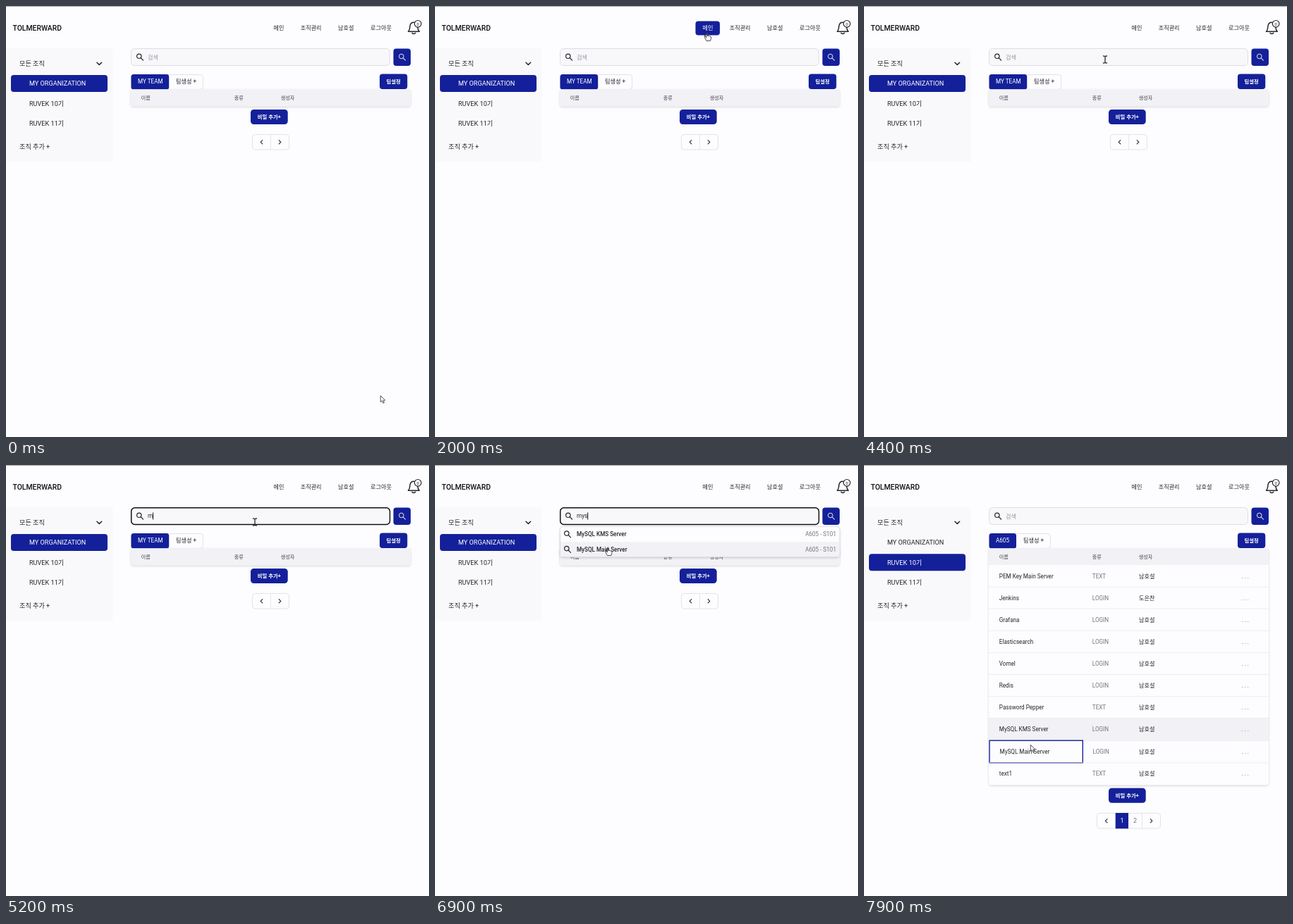
Recreate the animation shown at these times as an HTML page. Size 600 by 612 pixels, loop 8000 ms.

```html
<!DOCTYPE html>
<html lang="en">
<head>
<meta charset="utf-8">
<title>Team secrets</title>
<style>
  html, body { margin: 0; width: 100%; height: 100%; overflow: hidden; background: #fdfcfe; }
  svg { display: block; width: 600px; height: 612px; }
  text { font: 8.15px Roboto, "Noto Sans CJK KR", sans-serif; fill: #26262b; white-space: pre; }
  .side text { font-size: 9.15px; }
  .head text { font-size: 7.1px; fill: #44444c; }
  .title { font-size: 10.4px; font-weight: 500; fill: #111; }
  .btn { font-size: 7.4px; font-weight: 700; }
  .mid { text-anchor: middle; }
  .end { text-anchor: end; }
  .strong { font-weight: 500; }
  .dim { fill: #74747c; }
  .hint { fill: #96969e; }
  .white { fill: #fff; }
  .blue { fill: #14209a; }
  .soft { fill: #f2f1f5; }
  .box { fill: #fdfdff; stroke: #e2e2e8; }
  .line { fill: none; stroke: #26262b; stroke-linecap: round; stroke-linejoin: round; }
  .rule { stroke: #e6e6ec; }
  .cursor { fill: #fff; stroke: #3c3c42; stroke-width: .9; stroke-linejoin: round; }
  .shadow { filter: drop-shadow(0 1.5px 1.5px rgba(0, 0, 0, .17)); }
</style>
</head>
<body>
<svg viewBox="0 0 600 612">
  <defs>
    <g id="lens" class="line">
      <circle cx="-1.2" cy="-1.2" r="3.2"/>
      <path d="M1.2 1.2 4.5 4.5"/>
    </g>
    <path id="prev" class="line" d="M1.3 -2.6 -1.3 0 1.3 2.6" stroke-width="1.1"/>
    <path id="next" class="line" d="M-1.3 -2.6 1.3 0 -1.3 2.6" stroke-width="1.1"/>
  </defs>

  <rect width="600" height="612" fill="#fdfcfe"/>
  <rect width="600" height="1" fill="#a3a3a8"/>

  <!-- top bar -->
  <text class="title" x="9.5" y="34.8">TOLMERWARD</text>
  <text x="379.5" y="33.7">메인</text>
  <g data-on="1900,2400">
    <rect class="blue" x="369.5" y="21.5" width="34.5" height="20" rx="4"/>
    <text class="white strong" x="379.5" y="33.7">메인</text>
  </g>
  <text x="417.7" y="33.7">조직관리</text>
  <text x="471" y="33.7">남호설</text>
  <text x="517" y="33.7">로그아웃</text>
  <g class="line" stroke-width="1.5">
    <path d="M570.5 36.3C573 34 572.6 31.500 573 28.500C573.4 25.500 575.500 23.300 578.300 23.300C582 23.300 583.600 26 583.800 29C584 32.500 584 34 586.300 36.300Z"/>
    <path d="M576 38.200Q578.400 40.800 580.800 38.200"/>
    <circle cx="584.2" cy="25.300" r="4.800" fill="#fdfcfe" stroke-width="1.200"/>
  </g>
  <text class="mid" x="584.2" y="27.500" style="font-size:6px">0</text>

  <!-- side bar -->
  <g class="side">
    <rect y="60" width="151.500" height="161" fill="#f9f8fb"/>
    <text class="strong" x="19" y="84.700">모든 조직</text>
    <path class="line" d="M129 80.300 132.300 83.500 135.600 80.300" stroke-width="1.600"/>
    <rect class="soft" data-on="7200,7400" x="7" y="98" width="137" height="24" rx="4"/>
    <text x="33" y="113.300">MY ORGANIZATION</text>
    <text x="33" y="141.600">RUVEK 10기</text>
    <g data-on="0,7200">
      <rect class="blue" x="7" y="98" width="137" height="24" rx="4"/>
      <text class="white" x="33" y="113.300">MY ORGANIZATION</text>
    </g>
    <g data-on="7200,8000">
      <rect class="blue" x="7" y="126.300" width="137" height="24" rx="4"/>
      <text class="white" x="33" y="141.600">RUVEK 10기</text>
    </g>
    <text x="33" y="169.900">RUVEK 11기</text>
    <text x="19" y="202.500">조직 추가 +</text>
  </g>

  <!-- search -->
  <rect x="177.500" y="60.500" width="367" height="24" rx="5" fill="#f8f7fa" stroke="#dedde4"/>
  <rect data-on="4700,7200" x="177.700" y="60.700" width="366.800" height="23.800" rx="5" fill="none" stroke="#111" stroke-width="1.500"/>
  <use href="#lens" x="190" y="72.500" stroke-width="1.200"/>
  <text class="hint" data-on="0,5100" x="201" y="75.600">검색</text>
  <text class="hint" data-on="7200,8000" x="201" y="75.600">검색</text>
  <text id="query" x="201" y="75.400"></text>
  <rect id="caret" y="67.500" width="1" height="10" fill="#111"/>
  <rect class="blue" x="549.500" y="60.500" width="24.500" height="24.500" rx="4"/>
  <use href="#lens" x="562" y="72.700" style="filter:invert(1)" stroke-width="1.100"/>

  <!-- tabs -->
  <g data-on="0,7200">
    <rect class="box" x="177.500" y="97.500" width="102" height="21" rx="4"/>
    <rect class="blue" x="177.500" y="97" width="53.700" height="21.500" rx="3.500"/>
    <text class="white" x="187" y="110.400">MY TEAM</text>
    <text x="241" y="110.400">팀생성 +</text>
    <g data-on="3400,3900">
      <rect class="blue" x="232" y="97" width="48" height="21.500" rx="3"/>
      <text class="white" x="241" y="110.400">팀생성 +</text>
    </g>
  </g>
  <g data-on="7200,8000">
    <rect class="box" x="177.500" y="97.500" width="87" height="21" rx="4"/>
    <rect class="blue" x="177.500" y="97" width="38.500" height="21.500" rx="3.500"/>
    <text class="white" x="187" y="110.400">A605</text>
    <text x="226" y="110.400">팀생성 +</text>
  </g>
  <rect class="blue" x="530" y="96.500" width="39.300" height="21.500" rx="4"/>
  <text class="btn white mid" x="549.700" y="110">팀설정</text>

  <!-- table -->
  <rect class="shadow" id="card" x="177" y="118.500" width="397" height="24" rx="4" fill="#fdfdff"/>
  <g class="head">
    <path class="soft" d="M177 118.500H574V142H177Z"/>
    <text x="191.700" y="132.800">이름</text>
    <text x="323.700" y="132.800">종류</text>
    <text x="389.700" y="132.800">생성자</text>
  </g>
  <g id="rows" data-on="7500,8000"></g>

  <g id="add">
    <rect class="blue" x="347" y="147" width="52.700" height="21" rx="4.500"/>
    <text class="btn white mid" x="373.300" y="160.200">비밀 추가+</text>
  </g>
  <g data-on="0,7500">
    <rect class="box" x="349.500" y="182.500" width="52" height="21.500" rx="4"/>
    <path class="rule" d="M375.500 182.500V204"/>
    <use href="#prev" x="362.500" y="193.300"/>
    <use href="#next" x="388.500" y="193.300"/>
  </g>
  <g data-on="7500,8000">
    <rect class="box" x="330.500" y="494.500" width="90" height="21.500" rx="4"/>
    <path class="rule" d="M394.500 494.500V516"/>
    <rect class="blue" x="356.700" y="494" width="18.300" height="22.300"/>
    <text class="white mid" x="366" y="508.400" style="font-size:9px">1</text>
    <text class="dim mid" x="384.500" y="508.400" style="font-size:9px">2</text>
    <use href="#prev" x="343.700" y="505.300"/>
    <use href="#next" x="407.500" y="505.300"/>
  </g>

  <!-- suggestions -->
  <g data-on="5500,7200">
    <rect class="shadow" x="177.500" y="87.500" width="396.500" height="43" rx="4" fill="#fdfdff" stroke="#dcdce2" stroke-width=".8"/>
    <rect class="soft" data-on="6500,7200" x="178" y="109.300" width="395.500" height="20.700"/>
    <use href="#lens" x="188" y="98.300" stroke-width="1.200"/>
    <text class="strong" x="201" y="101.200">MySQL KMS Server</text>
    <text class="dim end" x="569" y="101.200">A605 - S101</text>
    <use href="#lens" x="188" y="119.800" stroke-width="1.200"/>
    <text class="strong" x="201" y="122.700">MySQL Main Server</text>
    <text class="dim end" x="569" y="122.700">A605 - S101</text>
  </g>

  <g id="cursor" class="cursor">
    <path id="arrow" d="M.3 .3V9.300L2.400 7.500 3.900 11 5.500 10.300 4 7H6.800Z"/>
    <path id="hand" d="M-1 1Q0-.8 1 1V4.500Q2-.1 0 4.500M-1 1V7L-2.400 5.500Q-4-.1-3.400 6.800L-1 11.500H4.500L5.600 8.500V5.800Q5 4.700 4 5.300Q3.500 4.300 2.500 4.800Q2 3.800 1 4.300V1Q0-.8-1 1Z"/>
    <path id="beam" class="line" stroke-width="1.300" d="M-2.500-5Q0-5 0-4Q0-5 2.500-5M0-4V4M-2.500 5Q0 5 0 4Q0 5 2.500 5"/>
  </g>
</svg>

<script>
const LOOP = 8000, STEP = 100;
const TOP = 142, ROW = 31.1, PICKED = 8;
const $ = id => document.getElementById(id);
const show = (el, on) => { el.style.display = on ? '' : 'none'; };

const owner = '남호설';
const secrets = [
  ['PEM Key Main Server', 'TEXT'], ['Jenkins', 'LOGIN', '도은찬'], ['Grafana', 'LOGIN'],
  ['Elasticsearch', 'LOGIN'], ['Vomel', 'LOGIN'], ['Redis', 'LOGIN'],
  ['Password Pepper', 'TEXT'], ['MySQL KMS Server', 'LOGIN'],
  ['MySQL Main Server', 'LOGIN'], ['text1', 'TEXT']
];

$('rows').innerHTML = secrets.map(([name, kind, by = owner], i) => {
  const shift = i >= PICKED ? 0.9 : 0;
  const inset = i === PICKED ? 0.8 : 0;
  const y = TOP + i * ROW + shift;
  const base = y + 18.6;
  const frame = '<rect x="178" y="391.200" width="132.300" height="31.600" fill="none" stroke="#14209a" stroke-width="1.400"/>';
  return `<rect class="soft hover" x="177" y="${y}" width="397" height="${ROW}"/>
    ${i ? `<path class="rule" d="M177 ${y}H574" stroke-width=".7"/>` : ''}
    <text x="${191.8 + inset}" y="${base}">${name}</text>
    <text class="dim" x="${323.8 + inset}" y="${base}">${kind}</text>
    <text class="strong" x="390" y="${base}">${by}</text>
    <text class="dim" x="535.500" y="${base}" letter-spacing="2">...</text>
    ${i === PICKED ? frame : ''}`;
}).join('');

// time, x, y and, where it changes, the cursor shape
const track = [
  [0, 531, 553, 'arrow'], [200, 531, 553], [900, 516, 462], [1400, 435, 230],
  [1800, 363, 52], [1900, 384, 40, 'hand'], [2000, 386, 38], [2200, 386, 38],
  [2400, 388, 54, 'arrow'], [2500, 387, 72, 'beam'], [2600, 384, 105, 'arrow'],
  [2800, 378, 155, 'hand'], [3100, 376, 157], [3300, 300, 128, 'arrow'],
  [3400, 272, 112, 'hand'], [3500, 268, 107], [3800, 268, 107],
  [4000, 288, 92, 'arrow'], [4200, 325, 80, 'beam'], [4400, 342, 76],
  [4700, 353, 81], [6000, 353, 81], [6300, 300, 94, 'hand'], [6800, 246, 116],
  [7100, 244, 119], [7200, 244, 122, 'arrow'], [7300, 244, 123],
  [7500, 242, 170], [7800, 238, 372], [7900, 236, 397]
];

function pointer(t) {
  let i = track.findLastIndex(p => p[0] <= t);
  const [t0, x0, y0] = track[i];
  const [t1, x1, y1] = track[i + 1] || [LOOP, x0, y0];
  const k = (t - t0) / (t1 - t0);
  let shape;
  for (; !shape; i--) shape = track[i][3];
  return { x: x0 + (x1 - x0) * k, y: y0 + (y1 - y0) * k, shape };
}

const timed = [...document.querySelectorAll('[data-on]')].map(el => [el, ...el.dataset.on.split(',').map(Number)]);
const hovers = document.querySelectorAll('.hover');
const word = 'mys', keys = [5100, 5300, 5500], focus = 4700, blur = 7200;

function render(t) {
  for (const [el, from, to] of timed) show(el, t >= from && t < to);

  const focused = t >= focus && t < blur;
  const pressed = keys.filter(k => k <= t);
  $('query').textContent = focused ? word.slice(0, pressed.length) : '';
  const sinceKey = t - (pressed.at(-1) || focus);
  show($('caret'), focused && sinceKey % 1000 < 500);
  $('caret').setAttribute('x', 201 + $('query').getComputedTextLength());

  const loaded = t >= 7500;
  $('card').setAttribute('height', loaded ? 336 : 24);
  $('add').setAttribute('transform', `translate(0 ${loaded ? 311.7 : 0})`);

  // row hover trails the pointer by one step
  const hot = Math.floor((pointer(Math.max(0, t - STEP)).y - TOP) / ROW);
  hovers.forEach((el, i) => show(el, i === hot));

  const { x, y, shape } = pointer(t);
  $('cursor').setAttribute('transform', `translate(${x} ${y})`);
  for (const id of ['arrow', 'hand', 'beam']) show($(id), id === shape);
}

const start = performance.now();
function tick() {
  const t = (performance.now() - start) % LOOP;
  render(Math.floor(t / STEP) * STEP);
  requestAnimationFrame(tick);
}
tick();
</script>
</body>
</html>
```
